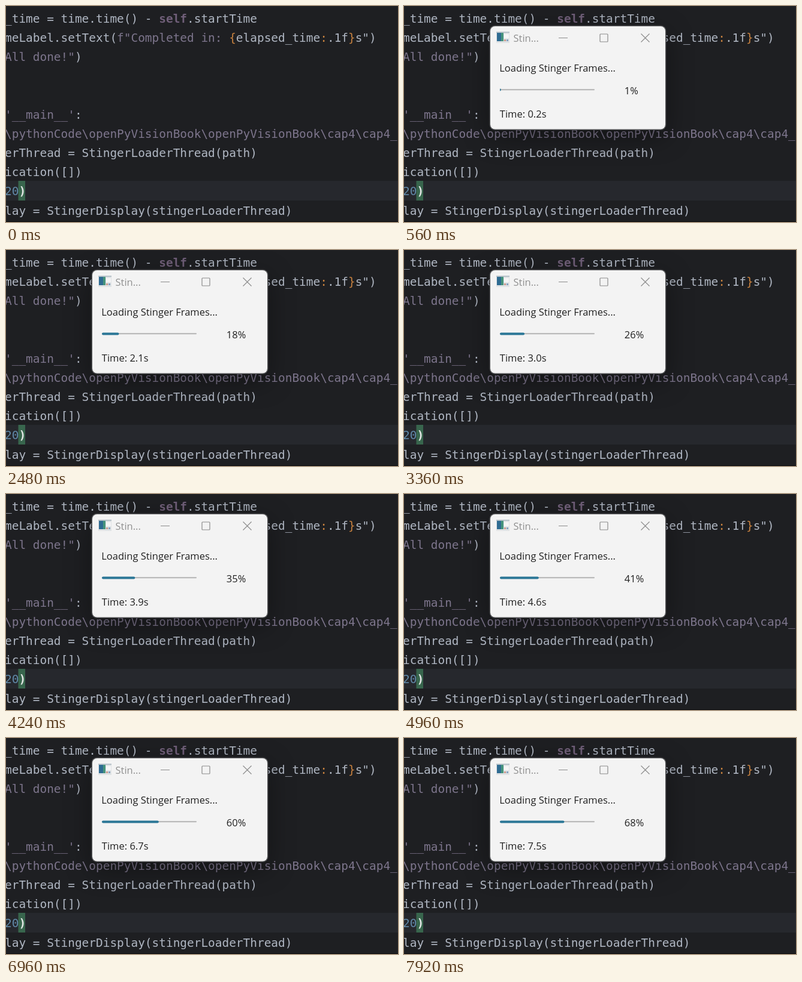
Write an HTML page with a canvas that moves like this. It is 654 px wide and 362 px high and loops after 8 s.

```html
<!DOCTYPE html>
<html lang="en">
<head>
<meta charset="utf-8">
<title>Loading dialog</title>
<style>
html, body { margin: 0; width: 100%; height: 100%; overflow: hidden; background: #1e1f22; }
canvas { display: block; }
</style>
</head>
<body>
<canvas id="stage"></canvas>
<script>
const W = 654, H = 362, LOOP = 8000, STEP = 80;
const canvas = document.getElementById('stage');
const ratio = window.devicePixelRatio || 1;
canvas.width = W * ratio;
canvas.height = H * ratio;
canvas.style.width = W + 'px';
canvas.style.height = H + 'px';
const ctx = canvas.getContext('2d');
ctx.scale(ratio, ratio);

const MONO = '19.43px "DejaVu Sans Mono", monospace';
const SANS = '16.5px "Open Sans", "Noto Sans", sans-serif';
const PLAIN = '#b0b7c3', STR = '#7d758c', SELF = '#705f79', ORANGE = '#c9823f', NUM = '#6189a8';
const CODE_X = -2, LINE_H = 32.2, BASE = 27.6;

// Row number, then text and colour pairs
const code = [
  [0, '_time = time.time() - ', PLAIN, 'self', SELF, '.startTime', PLAIN],
  [1, 'meLabel.setText(', PLAIN, 'f"Completed in: ', STR, '{', ORANGE, 'elapsed_time', PLAIN,
    ':', ORANGE, '.1f', PLAIN, '}', ORANGE, 's")', PLAIN],
  [2, 'All done!"', STR, ')', PLAIN],
  [5, "'__main__'", STR, ':', PLAIN],
  [6, '\\pythonCode\\openPyVisionBook\\openPyVisionBook\\cap4\\cap4_', STR],
  [7, 'erThread = StingerLoaderThread(path)', PLAIN],
  [8, 'ication([])', PLAIN],
  [9, '20', NUM, ')', '#e2e6e4'],
  [10, 'lay = StingerDisplay(stingerLoaderThread)', PLAIN]
];

// Time in ms, percent loaded, elapsed seconds
const progress = [
  [400, 0, 0], [1280, 7, 0.9], [2480, 18, 2.1], [4240, 35, 3.9],
  [5760, 48, 5.4], [6960, 60, 6.7], [7920, 68, 7.5]
];

function rect(x, y, w, h, color) {
  ctx.fillStyle = color;
  ctx.fillRect(x, y, w, h);
}

function pill(x, y, w, h, r, color) {
  ctx.beginPath();
  ctx.roundRect(x, y, w, h, r);
  ctx.fillStyle = color;
  ctx.fill();
}

function text(str, x, y, color) {
  ctx.fillStyle = color;
  ctx.fillText(str, x, y);
}

function drawEditor() {
  rect(0, 0, W, H, '#1e1f22');
  rect(0, 293, W, 33, '#26282d');
  rect(20.5, 293, 11.5, 33, '#38664d');
  for (const [row, ...parts] of code) {
    let x = CODE_X;
    for (let i = 0; i < parts.length; i += 2) {
      const bold = parts[i] === 'self' || (row === 9 && i > 0);
      ctx.font = (bold ? 'bold ' : '') + MONO;
      text(parts[i], x, BASE + row * LINE_H, parts[i + 1]);
      x += ctx.measureText(parts[i]).width;
    }
  }
  rect(0, H - 1, W, 1, '#0c0c0e');
}

function drawIcon(x, y) {
  rect(x, y, 22, 19, '#e0e3e5');
  rect(x, y, 22, 2, '#b9c3ca');
  rect(x + 1, y + 2, 7, 14, '#2f6c92');
  rect(x + 8, y + 2, 4, 14, '#46947c');
  rect(x + 13, y + 4, 8, 7, '#f5f5f5');
  rect(x + 13, y + 13, 3, 3, '#c99a8e');
  rect(x + 17, y + 13, 3, 3, '#8aa3c2');
}

function drawButtons() {
  ctx.strokeStyle = '#8b8b8b';
  ctx.lineWidth = 1.2;
  ctx.beginPath();
  ctx.moveTo(258, 53.5);
  ctx.lineTo(273, 53.5);
  ctx.moveTo(395.5, 46.5);
  ctx.lineTo(409.5, 60.5);
  ctx.moveTo(409.5, 46.5);
  ctx.lineTo(395.5, 60.5);
  ctx.roundRect(327, 47, 13, 13, 1);
  ctx.stroke();
}

function drawDialog(percent, seconds) {
  ctx.save();
  ctx.shadowColor = 'rgba(0,0,0,.38)';
  ctx.shadowBlur = 44 * ratio;
  ctx.shadowOffsetY = 12 * ratio;
  pill(142.5, 32.5, 295, 175.5, 9, '#505153');
  ctx.restore();
  pill(144, 34, 292, 172.5, 8, '#f3f3f3');

  drawIcon(154, 43);
  drawButtons();
  ctx.font = SANS;
  text('Stin...', 182.5, 60, '#8f8f8f');
  text('Loading Stinger Frames...', 159.3, 110, '#202020');
  text(percent + '%', 367.8, 148, '#202020');
  text('Time: ' + seconds.toFixed(1) + 's', 159.8, 186.5, '#202020');

  pill(160, 139.3, 158, 2, 1, '#b3b3b3');
  if (percent > 0) pill(160, 138.4, 1.58 * percent, 4, 2, '#2a7696');
}

function stateAt(t) {
  const next = progress.findIndex(p => t <= p[0]);
  if (next < 1) return next === 0 ? progress[0] : progress[progress.length - 1];
  const a = progress[next - 1], b = progress[next];
  const k = (t - a[0]) / (b[0] - a[0]);
  return a.map((v, i) => v + (b[i] - v) * k);
}

function render(now) {
  const t = Math.floor((now % LOOP) / STEP) * STEP;
  drawEditor();
  if (t >= progress[0][0]) {
    const [, percent, seconds] = stateAt(t);
    drawDialog(Math.floor(percent + 1e-6), seconds);
  }
}

let start;
function tick(now) {
  start ??= now;
  render(now - start);
  requestAnimationFrame(tick);
}
render(0);
requestAnimationFrame(tick);
</script>
</body>
</html>
```
